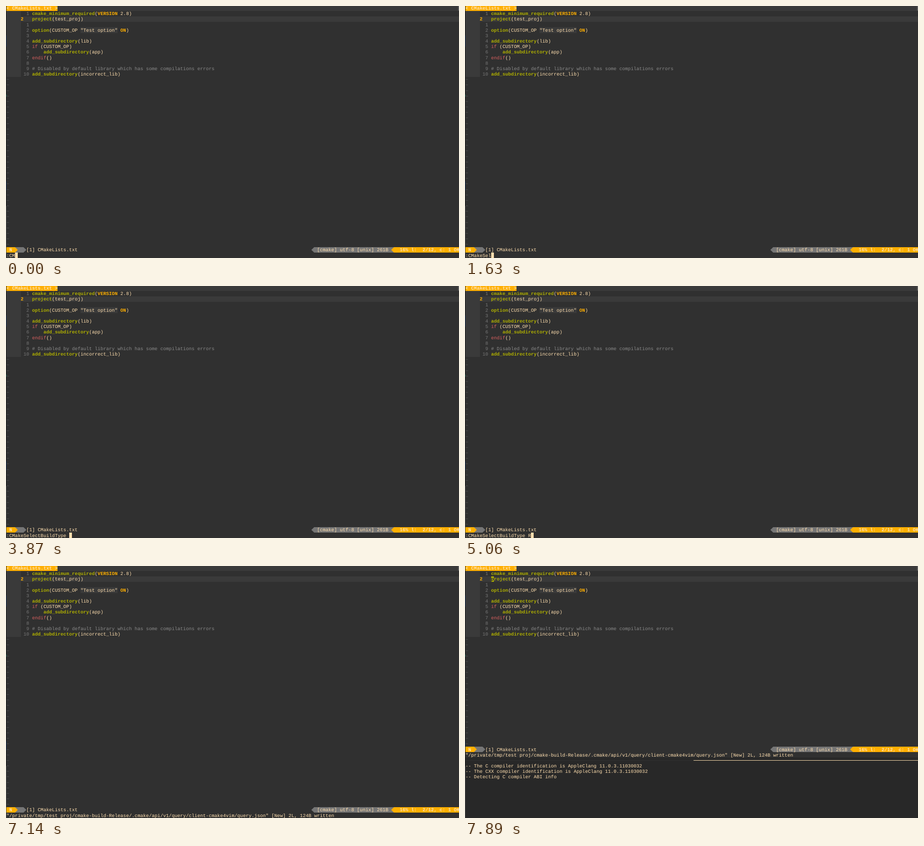
Animation of 1003x558 px, one loop 8 s. Source, as an HTML page with a canvas:

```html
<!DOCTYPE html>
<html lang="en">
<head>
<meta charset="utf-8">
<title>Terminal editor</title>
<style>
html, body { margin: 0; width: 100%; height: 100%; overflow: hidden; background: #303030; }
canvas { display: block; }
</style>
</head>
<body>
<canvas id="stage" width="1003" height="558"></canvas>
<script>
const ctx = document.getElementById('stage').getContext('2d');
const LOOP = 8000, WIDTH = 1003, HEIGHT = 558;
const CELL_W = 6.31, CELL_H = 12.165, BASELINE = 9.4;
const FONT = '10.515px "Liberation Mono", monospace';

const BG = '#303030', PANEL = '#3a3a3a', SHELL = '#282828', FG = '#ffdfaf';
const GREEN = '#afaf00', ORANGE = '#ffaf00', RED = '#d75f5f';
const GRAY = '#767676', COMMENT = '#8a8a8a', DIM = '#585858';

const colX = col => 0.9 + col * CELL_W;
const rowY = row => row * CELL_H - 1.3;

function box(x0, y0, x1, y1, color) {
  ctx.fillStyle = color;
  ctx.fillRect(x0, y0, x1 - x0, y1 - y0);
}

function cells(row, from, to, color) {
  box(Math.round(colX(from)), Math.round(rowY(row)),
      Math.min(WIDTH, Math.round(colX(to))), Math.round(rowY(row + 1)), color);
}

function text(row, col, string, color = FG, bold = false) {
  ctx.font = (bold ? 'bold ' : '') + FONT;
  ctx.fillStyle = color;
  [...string].forEach((char, i) => ctx.fillText(char, colX(col + i), rowY(row) + BASELINE));
}

// Draws consecutive [string, color, bold] runs.
function runs(row, col, parts) {
  for (const [string, color, bold] of parts) {
    text(row, col, string, color, bold);
    col += string.length;
  }
}

function arrow(row, baseCol, tipCol, color) {
  const top = Math.round(rowY(row)), bottom = Math.round(rowY(row + 1));
  ctx.fillStyle = color;
  ctx.beginPath();
  ctx.moveTo(colX(baseCol), top);
  ctx.lineTo(colX(tipCol), (top + bottom) / 2);
  ctx.lineTo(colX(baseCol), bottom);
  ctx.fill();
}

const call = name => [name, GREEN, true];
const plain = string => [string, FG];
const code = [
  [call('cmake_minimum_required'), plain('('), ['VERSION', ORANGE, true], plain(' 2.8)')],
  [call('project'), plain('(test_proj)')],
  [],
  [call('option'), plain('(CUSTOM_OP "Test option" '), ['ON', ORANGE, true], plain(')')],
  [],
  [call('add_subdirectory'), plain('(lib)')],
  [['if', RED], plain(' (CUSTOM_OP)')],
  [plain('    '), call('add_subdirectory'), plain('(app)')],
  [['endif', RED], plain('()')],
  [],
  [['# Disabled by default library which has some compilations errors', COMMENT]],
  [call('add_subdirectory'), plain('(incorrect_lib)')]
];

const command = ':CMakeSelectBuildType Release';
// [time, number of typed characters]
const typing = [[0, 3], [150, 4], [290, 5], [440, 6], [1030, 7], [1180, 8], [1630, 9],
  [1780, 10], [2220, 11], [2370, 12], [2970, 13], [3120, 21], [3870, 22], [5060, 23],
  [5210, 24], [5500, 26], [5950, 29]];
const written = '"/private/tmp/test proj/cmake-build-Release/.cmake/api/v1/query/' +
  'client-cmake4vim/query.json" [New] 2L, 124B written';
const output = [
  [7740, '-- The C compiler identification is AppleClang 11.0.3.11030032'],
  [7740, '-- The CXX compiler identification is AppleClang 11.0.3.11030032'],
  [7890, '-- Detecting C compiler ABI info']
];

function drawEditor(statusRow, cursorOnCode) {
  box(0, 0, WIDTH, 11, PANEL);
  cells(0, 0, 18, ORANGE);
  text(0, 0, '< CMakeLists.txt >', FG, true);
  box(1001.5, 0, 1002.5, 10, COMMENT);

  box(1, 11, 33, Math.round(rowY(13)), PANEL);
  cells(2, 5, 160, PANEL);
  cells(4, 26, 39, PANEL);
  code.forEach((parts, i) => {
    const row = i + 1, distance = String(Math.abs(row - 2));
    if (row === 2) text(row, 5, '2', ORANGE, true);
    else text(row, 8 - distance.length, distance, GRAY);
    runs(row, 9, parts);
  });
  if (cursorOnCode) {
    cells(2, 9, 10, GREEN);
    text(2, 9, 'p', BG, true);
  }
  for (let row = 13; row < statusRow; row++) text(row, 0, '~', DIM);
}

function drawStatus(row) {
  cells(row, 0, 3, ORANGE);
  cells(row, 3, 6, GRAY);
  arrow(row, 3, 4, ORANGE);
  arrow(row, 6, 7, GRAY);
  text(row, 1, 'N', FG, true);
  text(row, 7, '[1] CMakeLists.txt');

  arrow(row, 108, 107, GRAY);
  cells(row, 108, 136, GRAY);
  text(row, 109, '[cmake] utf-8 [unix] 261B');
  arrow(row, 136, 135, ORANGE);
  cells(row, 136, 160, ORANGE);
  text(row, 138, '16% l:  2/12, c: 1 OK', FG, true);
}

function drawMessage(time, row) {
  if (time < 7140) {
    const count = typing.findLast(([start]) => time >= start)[1];
    text(row, 0, command.slice(0, count));
    if (time < 6990) cells(row, count, count + 1, FG);
  } else {
    const selected = time >= 7290 && time < 7440;
    text(row, 0, selected ? 'Cmake target:  selected!' : written);
  }
}

function drawShell(time) {
  box(0, Math.round(rowY(35)), WIDTH, HEIGHT, SHELL);
  box(1, 430, 506, 431, BG);
  box(506, 430, WIDTH, 431, FG);
  output.forEach(([start, line], i) => {
    if (time >= start) text(36 + i, 0, line);
  });
}

// Sliver of the desktop beside the window.
function drawEdge() {
  box(0, 0, 1, 443, '#1c1c1c');
  box(0, 443, 1, HEIGHT, '#4a4a4a');
  box(0, 65, 1, 90, '#10294d');
  box(0, 196, 1, 201, '#12604f');
  box(0, 388, 1, 408, '#10294d');
}

function draw(time) {
  const split = time >= 7290, statusRow = split ? 33 : 44;
  ctx.textRendering = 'geometricPrecision';
  box(0, 0, WIDTH, HEIGHT, BG);
  drawEditor(statusRow, time >= 7440);
  drawStatus(statusRow);
  drawMessage(time, statusRow + 1);
  if (split) drawShell(time);
  drawEdge();
}

const began = performance.now();
function tick() {
  draw((performance.now() - began) % LOOP);
  requestAnimationFrame(tick);
}
tick();
</script>
</body>
</html>
```
